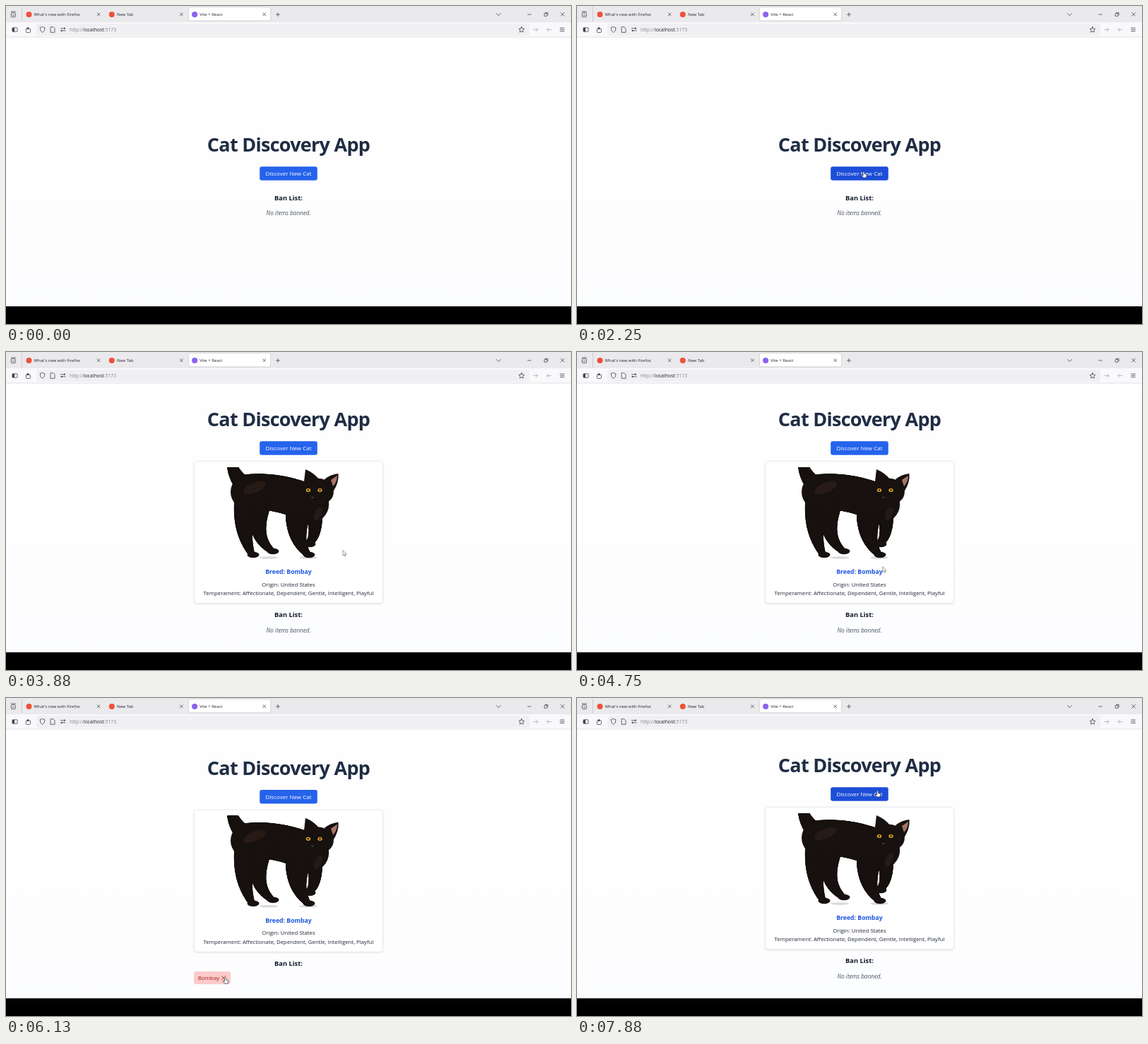
These frames come from a looping animation (800x450 px, 8 s). An HTML page with a canvas:

```html
<!DOCTYPE html>
<html lang="en">
<head>
<meta charset="utf-8">
<title>Cat Discovery App</title>
<style>
  html, body { margin: 0; width: 100%; height: 100%; overflow: hidden; background: #000; }
  canvas { display: block; width: 800px; height: 450px; }
</style>
</head>
<body>
<canvas id="stage" width="800" height="450"></canvas>
<script>
const ctx = document.getElementById('stage').getContext('2d');
const LOOP = 8000;
const CARD_AT = 2750, PHOTO_AT = 3500, BAN_AT = 5130, UNBAN_AT = 6230;
const FONT = '"Open Sans", "Noto Sans", sans-serif';
const INK = '#42424c', PALE = '#a9a9b2', COAT = '#17110f';

// The pointer glides from one place of interest to the next
const ENTRY = { x: 648, y: 279 };
const MOVES = [
  { from: 1630, to: 2130, x: 406, y: 234 },
  { from: 3380, to: 3880, x: 477, y: 281 },
  { from: 4250, to: 4950, x: 422, y: 310 },
  { from: 5630, to: 6150, x: 310, y: 395.5 },
  { from: 6500, to: 7200, x: 440, y: 140 },
  { from: 7380, to: 7750, x: 425.5, y: 131 }
];

const mix = (a, b, u) => a + (b - a) * u;
const ease = u => u * u * (3 - 2 * u);

function text(str, x, y, size, color, style = '', align = 'left', track = 0) {
  ctx.font = `${style} ${size}px ${FONT}`;
  ctx.letterSpacing = track + 'px';
  ctx.textAlign = align;
  ctx.fillStyle = color;
  ctx.fillText(str, x, y);
}

const centered = (str, y, size, color, style, track) =>
  text(str, 400, y, size, color, style, 'center', track);

function rect(x, y, w, h, fill) {
  ctx.fillStyle = fill;
  ctx.fillRect(x, y, w, h);
}

function box(x, y, w, h, r, fill, stroke) {
  ctx.beginPath();
  ctx.roundRect(x, y, w, h, r);
  if (fill) { ctx.fillStyle = fill; ctx.fill(); }
  if (stroke) { ctx.lineWidth = 0.8; ctx.strokeStyle = stroke; ctx.stroke(); }
}

function shadowed(blur, drop, alpha, paint) {
  ctx.save();
  ctx.shadowColor = `rgba(0,0,0,${alpha})`;
  ctx.shadowBlur = blur;
  ctx.shadowOffsetY = drop;
  paint();
  ctx.restore();
}

function oval(x, y, rx, ry, fill, tilt = 0) {
  ctx.beginPath();
  ctx.ellipse(x, y, rx, ry, tilt, 0, 7);
  ctx.fillStyle = fill;
  ctx.fill();
}

// SVG path drawn at an offset
function icon(d, x, y, stroke, fill, width = 0.8) {
  const p = new Path2D(d);
  ctx.save();
  ctx.translate(x, y);
  ctx.lineWidth = width;
  ctx.lineJoin = ctx.lineCap = 'round';
  if (fill) { ctx.fillStyle = fill; ctx.fill(p); }
  if (stroke) { ctx.strokeStyle = stroke; ctx.stroke(p); }
  ctx.restore();
}

const cross = (x, y, r, color = INK) => icon(`M${-r} ${-r}L${r} ${r}M${r} ${-r}L${-r} ${r}`, x, y, color);
const dash = (x, y, r) => icon(`M${-r} 0H${r}`, x, y, INK);
const arrow = (x, y, s) => icon(`M${-3 * s} 0H${3 * s}M${s / 2}-2.5L${3 * s} 0L${s / 2} 2.5`, x, y, PALE);

function star(x, y) {
  let d = '';
  for (let i = 0; i < 10; i++) {
    const a = i * Math.PI / 5, r = i % 2 ? 2 : 4.2;
    d += `${i ? 'L' : 'M'}${r * Math.sin(a)} ${-r * Math.cos(a)}`;
  }
  icon(d + 'Z', x, y, INK);
}

function tabs() {
  rect(0, 0, 800, 23, '#eaeaed');
  rect(22, 1, 1, 21, '#cdcdd3');
  shadowed(2, 0, 0.25, () => box(259, 2, 115, 18.5, 2, '#fff'));
  const titles = ["What's new with Firefox", 'New Tab', 'Vite + React'];
  titles.forEach((title, i) => {
    const x = 32.5 + i * 117.3;
    oval(x, 12, 4, 4, i < 2 ? '#ee5138' : '#8a63f0');
    text(title, x + 7.1, 14.2, 5.95, '#25252d');
    cross(x + 98.6, 11.8, 1.9);
  });
  box(7.3, 9.6, 6, 6, 1, null, INK);
  dash(10.3, 8, 3);
  dash(10.3, 13, 1.2);
  icon('M-2.5 0H2.5M0-2.5V2.5', 385, 12, INK);
  icon('M-3-1.4L0 1.5L3-1.4', 697.5, 12, INK);
  dash(741, 12, 2.2);
  box(762.2, 10.6, 3.8, 3.8, 0.5, null, INK);
  icon('M-1-2.6H2.6V1', 764.5, 12, INK);
  cross(788, 11.8, 2.4);
}

function toolbar() {
  rect(0, 23, 800, 21, '#f9f9fb');
  rect(0, 43.5, 800, 1, '#e3e3e8');
  box(43, 25, 698, 17, 3, '#f0f0f3');
  box(8.9, 30.7, 7.2, 5.6, 1, null, INK);
  rect(9, 31, 3, 5, INK);
  box(28.4, 32, 6, 5.5, 1, null, INK);
  oval(31, 31.4, 1.5, 1.5, INK);
  icon('M0-4L3.4-2.7Q3.6 2.4 0 4Q-3.6 2.4-3.4-2.7Z', 51.6, 33.5, INK);
  icon('M-2.7-3.8H.7L2.8-1.6V3.8H-2.7Z', 66.2, 33.5, INK);
  for (const s of [-1, 1]) {
    dash(80.8 + s, 33.3 + s * 1.6, 2.4);
    oval(80.8 - s * 2.2, 33.3 + s * 1.6, 1.1, 1.1, INK);
  }
  text('http://', 90, 36.3, 6.83, '#85858e');
  text('localhost', 110, 36.3, 6.83, '#1c1c24');
  text(':5173', 138.7, 36.3, 6.83, '#85858e');
  star(730, 33.7);
  arrow(750, 33.5, 1);
  arrow(769, 33.5, -1);
  for (const row of [-1, 0, 1]) dash(787.5, 33.3 + row * 2.3, 2.8);
}

// Tapered stroke along a quadratic curve
function limb([x0, y0], [cx, cy], [x1, y1], r0, r1) {
  for (let u = 0; u <= 1; u += 0.02) {
    const r = mix(r0, r1, u);
    oval(mix(mix(x0, cx, u), mix(cx, x1, u), u), mix(mix(y0, cy, u), mix(cy, y1, u), u), r, r, COAT);
  }
}

function leg(hip, knee, foot, width) {
  limb(hip, knee, foot, width, 4.5);
  oval(foot[0] + 2, foot[1] + 1, 8.5, 4.2, COAT);
}

function cat() {
  ctx.save();
  ctx.beginPath();
  ctx.rect(275, 163, 250, 130);
  ctx.clip();
  for (const x of [372, 428]) oval(x, 291, 13, 1.7, '#d9d9d9');

  limb([320, 160], [324, 178], [341, 192], 7, 13);
  limb([343, 198], [388, 195], [432, 216], 25, 27);
  leg([341, 214], [332, 255], [348, 286], 18);
  leg([358, 222], [351, 262], [376, 281], 15);
  leg([413, 233], [409, 266], [427, 286], 17);
  leg([437, 232], [440, 262], [428, 271], 11);

  oval(443, 197, 21, 18, COAT, 0.25);
  icon('M421 192L424 166Q436 171 443 180Z', 0, 0, null, COAT);
  icon('M451 180Q460 173 470.5 172Q472 184 463 198Z', 0, 0, null, COAT);
  icon('M460 181L469 175Q469 184 463 190Z', 0, 0, null, '#a57466');
  for (const x of [428, 444.5]) {
    oval(x, 195.5, 3.2, 2.6, '#d8a12a');
    oval(x, 195.5, 1.2, 1.3, COAT);
  }
  oval(434, 206, 2.2, 1.3, '#3a322f');
  oval(352, 192, 17, 7, 'rgba(78,51,40,.3)', -0.4);
  oval(442, 229, 5, 10, 'rgba(62,45,39,.35)', 0.4);
  ctx.restore();
}

function card(photo) {
  const x = photo ? 266.5 : 270.5, w = 800 - 2 * x;
  shadowed(3, 1, 0.12, () => box(x, 154.5, w, 201, 4, '#fff'));
  box(x, 154.5, w, 201, 4, null, '#e4e7ec');
  if (photo) cat();
  else text('Bombay', 281, 174, 7.85, '#1f2937');
  centered('Breed: Bombay', 314.4, 8.7, '#1d55e0', 'bold');
  centered('Origin: United States', 331.6, 7.87, '#1f2937');
  centered('Temperament: Affectionate, Dependent, Gentle, Intelligent, Playful', 344.2, 7.84, '#1f2937');
}

// Paints the page and tells whether the pointer is over something clickable
function page(t, tip) {
  const found = t >= CARD_AT, banned = t >= BAN_AT && t < UNBAN_AT;
  const dy = found ? (banned ? 3.8 : 0) : 101;
  const over = (x, y, w, h) =>
    tip && tip.x >= x && tip.x <= x + w && tip.y >= y + dy && tip.y <= y + dy + h;
  const onButton = over(359, 126, 82, 20);

  const sky = ctx.createLinearGradient(0, 270, 0, 425);
  sky.addColorStop(0, '#fefefe');
  sky.addColorStop(1, '#fcfdff');
  rect(0, 44, 800, 381, sky);

  ctx.save();
  ctx.translate(0, dy);
  centered('Cat Discovery App', 105, 27, '#1f2d43', 'bold', -0.73);
  box(359.2, 126.3, 81.6, 19.5, 3, onButton ? '#1d4ed8' : '#2563eb');
  centered('Discover New Cat', 139.4, 8, '#fff');
  if (found) card(t >= PHOTO_AT);
  else ctx.translate(0, -201.6);
  centered('Ban List:', 375.4, 9.3, '#0f172a', 'bold');
  if (banned) {
    box(266, 383.2, 52, 18, 3, '#fecaca');
    text('Bombay', 272, 395.4, 7.85, '#991b1b');
    cross(308, 392.4, 2.7, '#991b1b');
  } else {
    centered('No items banned.', 396.8, 8.1, '#4b5563', 'italic');
  }
  ctx.restore();
  return onButton || found && over(367, 305, 66, 12) || banned && over(266, 383, 52, 18);
}

function pointerAt(t) {
  if (t < MOVES[0].from) return null;
  let { x, y } = ENTRY;
  for (const m of MOVES) {
    const u = ease(Math.min(1, Math.max(0, (t - m.from) / (m.to - m.from))));
    x = mix(x, m.x, u);
    y = mix(y, m.y, u);
  }
  return { x, y };
}

function pointer({ x, y }, hand) {
  if (hand) icon('M-1 1Q0-.6 1 1V3.4L4.2 4.6L3.6 9H-.6L-3.2 5.4L-1 5.6Z', x, y, '#222a3a', '#fff', 0.7);
  else icon('M0 0V7L1.7 5.5L2.8 8L3.9 7.5L2.8 5.1H4.8Z', x, y, '#55555d', '#fff', 0.6);
}

function draw(t) {
  const tip = pointerAt(t);
  const hand = page(t, tip);
  tabs();
  toolbar();
  rect(0, 425, 800, 25, '#000');
  if (tip) pointer(tip, hand);
}

const start = performance.now();
function tick() {
  draw((performance.now() - start) % LOOP);
  requestAnimationFrame(tick);
}
tick();
</script>
</body>
</html>
```
